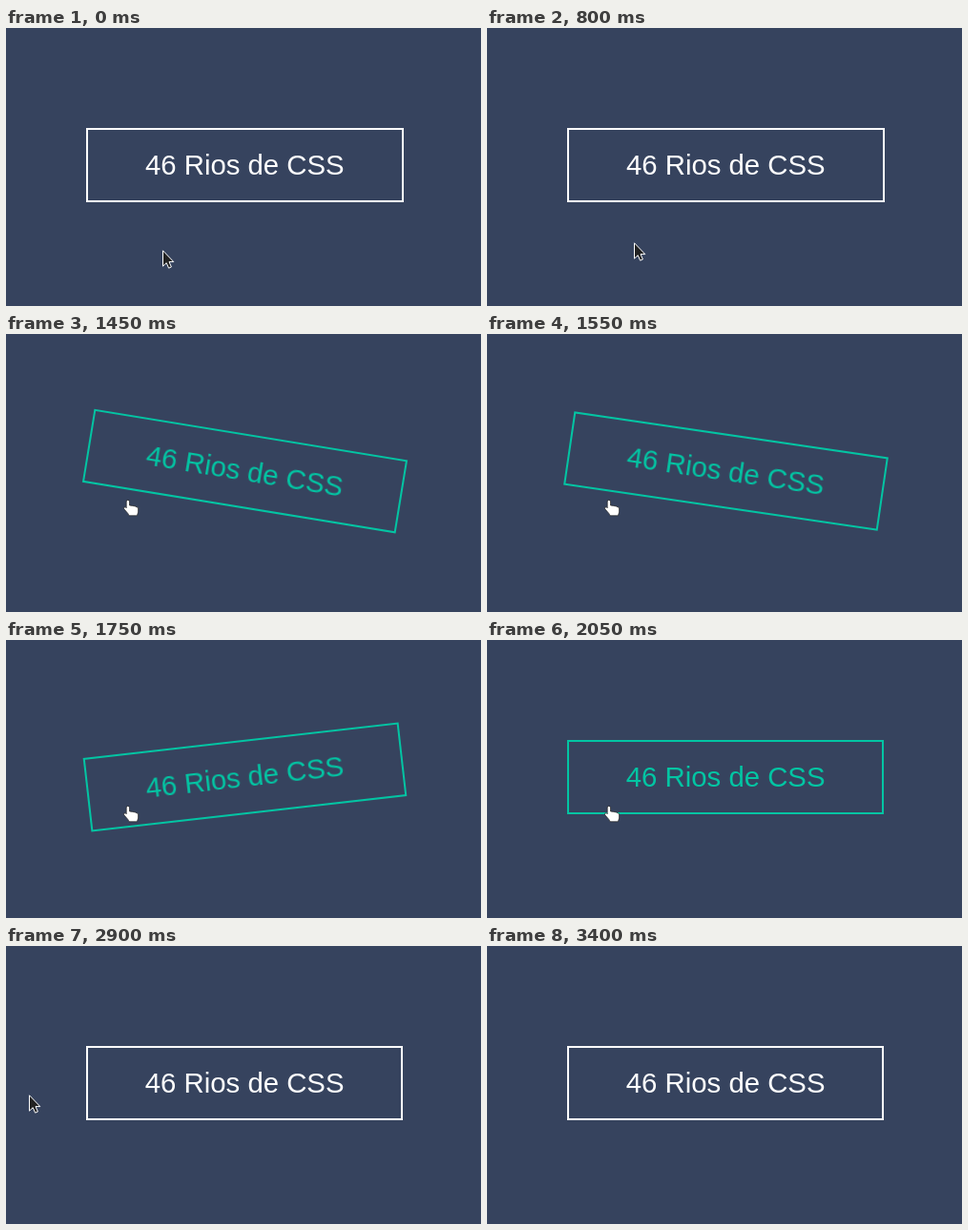
Animation, 498 px wide and 292 px high, one loop 4.15 s. Source, as an HTML page:

```html
<!DOCTYPE html>
<html lang="pt">
<head>
<meta charset="utf-8">
<title>Botão</title>
<style>
  html, body {
    margin: 0;
    width: 100%;
    height: 100%;
    overflow: hidden;
    background: #36435e;
  }
  .button {
    position: absolute;
    left: 83.85px;
    top: 105px;
    width: 332.6px;
    height: 78px;
    box-sizing: border-box;
    border: 2px solid;
    color: #fff;
    font: 29.33px/74px "Liberation Sans", Arial, sans-serif;
    text-align: center;
    white-space: nowrap;
    /* paused: --t scrubs both animations through their delay */
    animation: swing 593ms ease both paused, tint 1250ms ease both paused;
    animation-delay: calc(1277ms - var(--t) * 1ms), calc(1230ms - var(--t) * 1ms);
  }
  @keyframes swing {
    0%, 100% { transform: rotate(0deg); }
    43.2% { transform: rotate(10deg); }
    73.9% { transform: rotate(-10deg); }
  }
  @keyframes tint {
    0%, 100% { color: #fff; }
    16%, 84% { color: #02c5a3; }
  }
  svg {
    position: absolute;
    left: 0;
    top: 0;
    overflow: visible;
  }
</style>
</head>
<body>
<div class="button">46 Rios de CSS</div>
<svg width="20" height="22">
  <path id="arrow" d="M.5 .8V17.2L4.2 13.7L6.6 19.2L9.4 18L7 12.6H11.8Z" fill="#222" stroke="#fff"/>
  <path id="hand" d="M4.7 .4Q6.5 .4 6.5 2V6L9.5 6.4L12.5 7L15.6 8.6V13L14.4 16.8H6L4.8 14.4L.6 9.6Q.2 7.4 2.2 7.8L3.2 8.8V2Q3.2 .4 4.7 .4Z" fill="#fff" stroke="#222" stroke-width=".7"/>
</svg>
<script>
  const LOOP = 4150;
  const ENTER = 1200, LEAVE = 2300, GONE = 3400;
  const button = document.querySelector(".button");
  const pointer = document.querySelector("svg");
  const arrow = document.getElementById("arrow");
  const hand = document.getElementById("hand");

  // pointer path: time, x, y
  const path = [
    [750, 164, 233], [800, 154, 225], [1000, 128, 184], [1300, 124, 179],
    [1400, 123, 174], [2250, 123, 174], [2300, 105, 201], [2500, 58, 227],
    [2800, 22, 192], [3300, 33, 11]
  ];

  const show = (el, on) => { el.style.display = on ? "" : "none"; };
  const snap = (t, step) => Math.floor(t / step) * step;

  function place(t) {
    const i = path.findIndex(p => p[0] > t);
    if (i < 0) return path[path.length - 1].slice(1);
    const [t1, x1, y1] = path[i];
    const [t0, x0, y0] = path[Math.max(i - 1, 0)];
    const k = t1 > t0 ? (t - t0) / (t1 - t0) : 0;
    return [x0 + (x1 - x0) * k, y0 + (y1 - y0) * k].map(Math.round);
  }

  function draw(now) {
    const t = snap(now % LOOP, 50);
    const hover = t >= ENTER && t < LEAVE;
    const [x, y] = place(t < ENTER || t >= 2500 ? snap(t, 100) : t);
    button.style.setProperty("--t", t);
    pointer.style.transform = `translate(${x}px, ${y}px)`;
    show(pointer, t < GONE);
    show(hand, hover);
    show(arrow, !hover);
  }

  const start = performance.now();
  function tick() {
    draw(performance.now() - start);
    requestAnimationFrame(tick);
  }
  tick();
</script>
</body>
</html>
```
